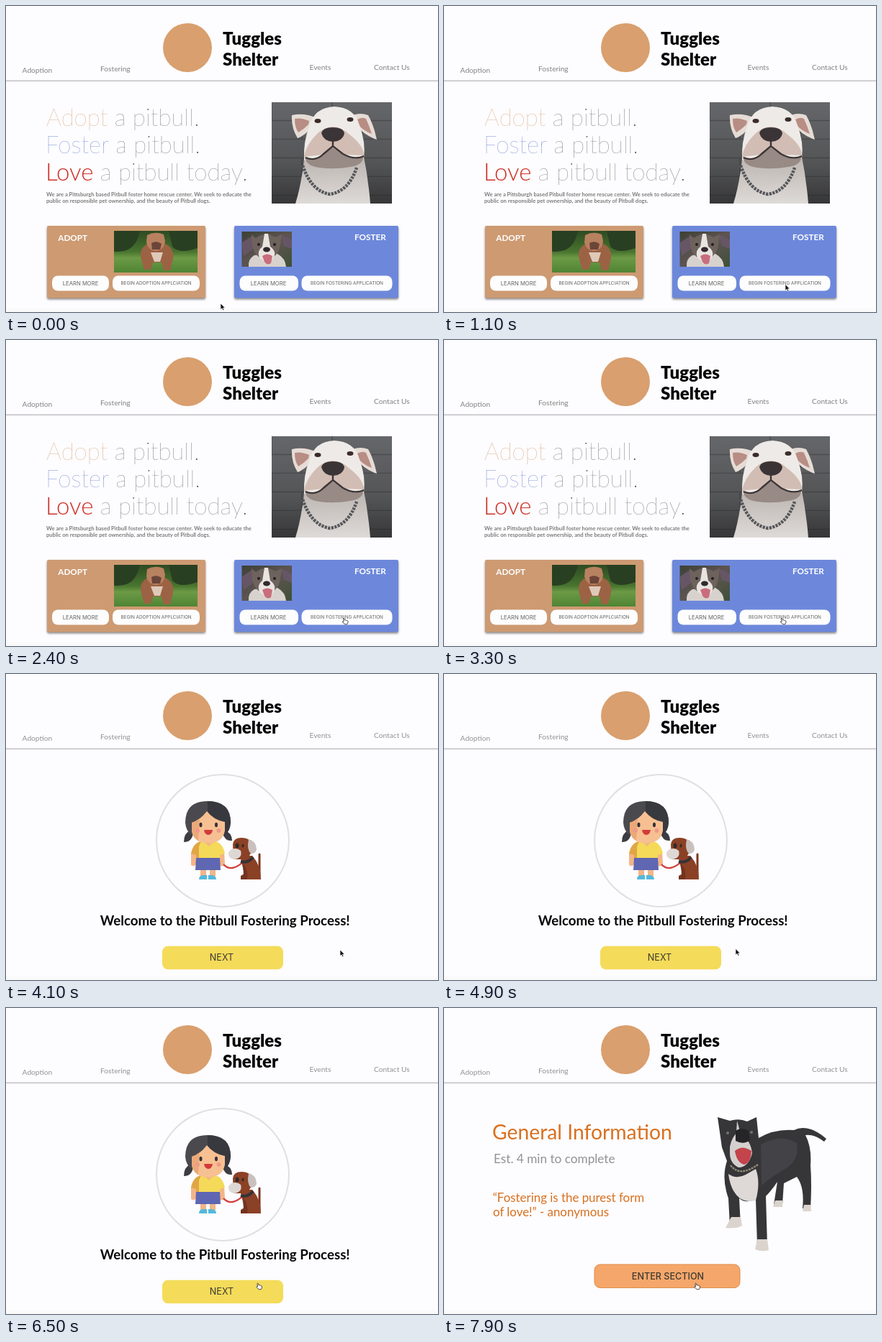
An HTML page that plays this animation: 600x426 px, repeating every 8 s.

```html
<!DOCTYPE html>
<html lang="en">
<head>
<meta charset="utf-8">
<title>Pitbull fostering walkthrough</title>
<style>
html, body { margin: 0; width: 100%; height: 100%; overflow: hidden; background: #fdfcfe; }
svg { display: block; width: 600px; height: 426px; font-family: Lato, sans-serif; }
.nav { font-size: 10.2px; fill: #929292; }
.home .nav { fill: #828282; }
.brand { font-size: 24px; font-weight: 900; fill: #050505; }
.hero { font-size: 33px; font-weight: 100; fill: #555; }
.love { font-weight: 300; fill: #cc2f26; }
.note { font-size: 7.6px; font-weight: 700; fill: #7c7c7c; }
.card { filter: drop-shadow(0 2px 1.5px #0007); }
.label { font-size: 11.7px; font-weight: 700; fill: #fff; }
.btn { font-family: Inter, sans-serif; text-anchor: middle; fill: #626262; }
.big { font-size: 12.6px; fill: #3d3a30; }
.quote { font-size: 16.9px; fill: #d8701f; }
</style>
</head>
<body>
<svg id="stage" viewBox="0 0 600 426">
  <defs>
    <pattern id="brick" width="84" height="52" x="349" y="134" patternUnits="userSpaceOnUse">
      <rect width="84" height="52" fill="#696a6d"/>
      <path d="M0 25.5H84M0 51.5H84M20 0V25M62 26V51" stroke="#515255" stroke-width="1.6"/>
    </pattern>
    <linearGradient id="vignette" x2="0" y2="1">
      <stop offset="0" stop-color="#222" stop-opacity=".05"/>
      <stop offset=".6" stop-color="#222" stop-opacity=".3"/>
      <stop offset="1" stop-color="#1a1a1a" stop-opacity=".65"/>
    </linearGradient>
    <linearGradient id="chest" x2="0" y2="1">
      <stop offset="0" stop-color="#b9b2ae"/>
      <stop offset="1" stop-color="#dedad7"/>
    </linearGradient>
    <linearGradient id="garden" x2="0" y2="1">
      <stop offset="0" stop-color="#2e4a22"/>
      <stop offset=".5" stop-color="#48742f"/>
      <stop offset=".65" stop-color="#6c9a45"/>
      <stop offset="1" stop-color="#4f8434"/>
    </linearGradient>
    <linearGradient id="blooms" x2="1" y2="1">
      <stop offset="0" stop-color="#3c4034"/>
      <stop offset=".5" stop-color="#5d5452"/>
      <stop offset="1" stop-color="#3f5035"/>
    </linearGradient>
  </defs>

  <rect width="600" height="426" fill="#fdfcfe"/>
  <rect y="421" width="600" height="5" fill="#fafafa"/>

  <!-- header -->
  <circle cx="252" cy="58" r="34" fill="#d99f6e"/>
  <g class="brand"><text x="301" y="53.5">Tuggles</text><text x="301" y="82.5">Shelter</text></g>
  <g class="nav">
    <text x="22.6" y="93">Adoption</text><text x="131" y="91.2">Fostering</text>
    <text x="421.5" y="88.5">Events</text><text x="511" y="88.5">Contact Us</text>
  </g>
  <rect y="103.2" width="600" height="2" fill="#cfcdd0"/>

  <!-- home -->
  <g class="page">
    <g class="hero">
      <text x="56" y="166.5"><tspan fill="#c98f5e">Adopt</tspan> a pitbull.</text>
      <text x="55" y="204.5"><tspan fill="#4766c4">Foster</tspan> a pitbull.</text>
      <text x="55" y="243"><tspan class="love">Love</tspan> a pitbull today.</text>
    </g>
    <g class="note">
      <text x="56" y="265">We are a Pittsburgh based Pitbull foster home rescue center. We seek to educate the</text>
      <text x="56" y="274">public on responsible pet ownership, and the beauty of Pitbull dogs.</text>
    </g>

    <svg x="369" y="134" width="167" height="141" viewBox="369 134 167 141">
      <rect x="369" y="134" width="167" height="141" fill="url(#brick)"/>
      <rect x="369" y="134" width="167" height="141" fill="url(#vignette)"/>
      <path d="M415 205Q411 246 402 275H506Q503 238 496 205Z" fill="url(#chest)"/>
      <path d="M432 156Q414 148 397 152Q396 170 405 184Q416 180 425 168ZM478 154Q490 147 503 152Q511 166 515 186Q498 180 488 168Z" fill="#e6dcd6"/>
      <path d="M421 160Q410 155 401 157Q401 169 406 176Q413 172 420 165ZM488 158Q495 154 500 157Q505 168 508 178Q497 174 490 166Z" fill="#b88d83"/>
      <path d="M421 168Q428 141 456 140Q484 141 491 166Q500 190 497 213Q478 224 456 223Q432 224 414 214Q413 188 421 168Z" fill="#eeeae7"/>
      <path d="M432 178Q454 158 476 178Q497 194 497 208L470 207 454 197 440 207 414 210Q416 194 432 178Z" fill="#d2bdb4"/>
      <path d="M415 210Q428 218 440 207L454 197 468 207Q486 217 497 208Q496 222 478 224Q456 228 435 225Q417 223 415 210Z" fill="#988a85"/>
      <path d="M416 211Q430 217 441 206L454 195 468 206Q484 215 497 209M454 187V196" fill="none" stroke="#3c3535" stroke-width="2.4"/>
      <path d="M438 177Q440 169 454 169Q468 169 470 177Q468 188 454 189Q441 188 438 177Z" fill="#3b3436"/>
      <ellipse cx="433" cy="160" rx="4.5" ry="3" fill="#3a2b29"/>
      <ellipse cx="478" cy="158" rx="4.5" ry="3" fill="#3a2b29"/>
      <path d="M412 222Q424 258 450 262Q476 258 487 225" fill="none" stroke="#55565a" stroke-width="4.5" stroke-dasharray="3.2 1.4"/>
    </svg>

    <rect class="card" x="57" y="306" width="220" height="100.5" rx="2" fill="#cd9a72"/>
    <rect class="card" x="317" y="306" width="228" height="100.5" rx="2" fill="#6d88db"/>
    <text class="label" x="72.3" y="326.7">ADOPT</text>
    <text class="label" x="484" y="325.7">FOSTER</text>

    <svg x="150" y="313" width="116" height="58" viewBox="150 313 116 58">
      <rect x="150" y="313" width="116" height="58" fill="url(#garden)"/>
      <path d="M150 313H186Q181 338 163 341T150 338ZM226 313H266V337Q241 346 231 335Z" fill="#293f22"/>
      <path d="M195 332Q184 339 188 353L192 367H201L204 357H216L219 368H228L232 352Q234 337 221 331Z" fill="#9c6244"/>
      <path d="M196 319Q207 313 219 318L221 327Q220 340 208 341Q197 340 195 329Z" fill="#b88160"/>
      <path d="M202 330Q209 326 216 331L214 339H203Z" fill="#6b4539"/>
      <path d="M201 343H218L214 356H206Z" fill="#dec9b9"/>
    </svg>

    <svg x="327.500" y="314" width="69.500" height="49" viewBox="327.500 314 69.500 49">
      <rect x="327" y="314" width="71" height="49" fill="url(#blooms)"/>
      <path d="M327 330L342 320 345 337 330 348ZM382 318L398 326V338L386 334Z" fill="#665665"/>
      <path d="M345 347Q336 352 337 363H389Q388 351 377 345Z" fill="#d8d2ce"/>
      <path d="M347 323L341 318 342 333Q345 350 361 354Q378 350 381 333L383 318 374 322Q361 313 347 323Z" fill="#6e625d"/>
      <path d="M359 317H364L367 335Q377 342 371 352Q362 359 352 351Q348 341 356 335Z" fill="#e9e4e0"/>
      <ellipse cx="362" cy="339" rx="5" ry="3.5" fill="#302a2d"/>
      <path d="M356 348Q363 343 370 348L368 358Q363 362 359 356Z" fill="#c96d7d"/>
      <circle cx="351" cy="332" r="2" fill="#241f20"/><circle cx="373" cy="332" r="2" fill="#241f20"/>
    </svg>

    <g fill="#fdfdfe">
      <rect x="64" y="375.5" width="79" height="21" rx="8"/>
      <rect x="148" y="375.5" width="121" height="21" rx="8"/>
      <rect x="324.5" y="375.5" width="81.5" height="21" rx="8"/>
      <rect x="410.5" y="375.5" width="126" height="21" rx="8"/>
    </g>
    <g class="btn" font-size="7.7">
      <text x="103.5" y="388.8">LEARN MORE</text><text x="364.500" y="388.8">LEARN MORE</text>
    </g>
    <g class="btn" font-size="6.4">
      <text x="208.5" y="388.3">BEGIN ADOPTION APPLCIATION</text>
      <text x="473.5" y="388.3">BEGIN FOSTERING APPLICATION</text>
    </g>
  </g>

  <!-- welcome -->
  <g class="page">
    <circle cx="301" cy="232" r="92" fill="#fdfcfe" stroke="#e0dfe1" stroke-width="2"/>
    <!-- girl -->
    <path d="M258 217Q247 220 247 234Q258 234 260 222ZM303 217Q314 221 314 232Q304 233 301 222Z" fill="#3c3c43"/>
    <path d="M249 207Q249 177 280 177Q312 177 312 207Q311 219 304 224H257Q250 218 249 207Z" fill="#4a494e"/>
    <path d="M280 177Q312 177 312 207Q311 219 304 224H280Z" fill="#38383f"/>
    <path d="M276 230H287V241H276Z" fill="#e9a577"/>
    <path d="M257 248H264V265Q261 269 257 266ZM297 248H303L304 264Q303 269 297 267Z" fill="#f3b587"/>
    <path d="M270 272H278V282H270ZM283 272H291V282H283Z" fill="#f3b587"/>
    <path d="M268 286Q268 280 274 280H279V286ZM281 286V280H286Q292 281 292 286Z" fill="#53b8dc"/>
    <path d="M271 233H290Q301 235 304 250L297 252V258H264V252L257 250Q260 235 271 233Z" fill="#f4da58"/>
    <path d="M271 233Q260 235 257 250L264 252V258H268V240Z" fill="#e0a646"/>
    <path d="M264 256H297L298 273H263Z" fill="#5f66b2"/>
    <path d="M258 207Q270 203 279 191Q288 203 304 206V218Q301 235 281 236Q260 235 258 218Z" fill="#f7c092"/>
    <path d="M258 207Q264 205 269 201L267 232Q259 227 258 218Z" fill="#eca978"/>
    <path d="M275 233Q281 238 288 233L282 240Z" fill="#f3b587"/>
    <ellipse cx="270.500" cy="210" rx="2" ry="3.3" fill="#343139"/>
    <ellipse cx="292" cy="210" rx="2" ry="3.3" fill="#343139"/>
    <circle cx="266" cy="218" r="3" fill="#f0998b"/><circle cx="295.500" cy="218" r="3" fill="#f0998b"/>
    <path d="M275 217H287Q286 224 281 224Q276 224 275 217Z" fill="#d23b39"/>
    <!-- leashed dog -->
    <path d="M302 265Q313 277 330 261" fill="none" stroke="#d23e3b" stroke-width="2.4"/>
    <path d="M352 282V251" stroke="#7c351f" stroke-width="3" stroke-linecap="round"/>
    <path d="M325 253H342Q354 266 354 286H326V281L331 278Z" fill="#8b4125"/>
    <path d="M329 264Q337 273 335 286H326V282L330 280Z" fill="#72331f"/>
    <path d="M315 237Q316 228 327 228Q341 228 342 241Q341 255 330 258H316Z" fill="#8b4125"/>
    <path d="M337 230Q347 232 348 244Q347 250 340 250Q334 244 337 230Z" fill="#c9c1bf"/>
    <path d="M313 244Q321 241 326 246Q329 256 317 258Q308 257 309 248Z" fill="#ded8d5"/>
    <ellipse cx="321" cy="239" rx="2.500" ry="3.500" fill="#302b2b"/>
    <ellipse cx="329" cy="239" rx="1.500" ry="2.500" fill="#302b2b"/>
    <path d="M326 261Q336 264 343 255" fill="none" stroke="#363338" stroke-width="4"/>

    <text x="130.8" y="350" font-size="18.7" font-weight="700" fill="#080808">Welcome to the Pitbull Fostering Process!</text>
    <rect x="217" y="378.800" width="168" height="32.500" rx="8" fill="#f4db5a"/>
    <text class="btn big" x="299.500" y="399">NEXT</text>
  </g>

  <!-- section -->
  <g class="page">
    <text x="67" y="183" font-size="28.3" fill="#d9701f">General Information</text>
    <text x="69" y="216" font-size="17.2" fill="#929292">Est. 4 min to complete</text>
    <g class="quote">
      <text x="67.700" y="269.500">“Fostering is the purest form</text>
      <text x="68" y="290">of love!” - anonymous</text>
    </g>

    <path d="M380 152L397 157Q410 153 421 158L434 152 437 181Q459 168 486 170Q505 160 531 182L528 186Q513 175 502 177Q511 194 509 219Q511 246 509 279H498Q501 249 490 235L472 244 470 274H458L463 242Q455 254 447 262L449 330H435L433 266Q419 273 410 265L412 303H397L395 265Q385 237 393 213L386 194Z" fill="#363538"/>
    <path d="M440 190Q468 174 490 188Q494 209 477 222Q455 235 441 247Z" fill="#434246"/>
    <path d="M395 231Q406 239 419 232L433 224Q440 243 433 268Q421 271 411 265Q398 255 395 231Z" fill="#ded9d6"/>
    <path d="M407 157L412 175Q426 184 428 202Q423 222 409 222Q396 216 397 199Q396 186 406 174Z" fill="#d5d0cf"/>
    <path d="M405 171Q413 165 423 171L425 184Q416 191 405 185Z" fill="#252427"/>
    <path d="M404 199Q414 190 427 199Q426 216 417 218Q407 216 404 199Z" fill="#c4444b"/>
    <path d="M398 219Q411 236 436 218" fill="none" stroke="#918877" stroke-width="2.5" stroke-dasharray="3 1"/>
    <path d="M399 291H412L414 303Q405 308 391 306ZM435 322H449L451 337Q442 340 432 336ZM460 268H470V277H457ZM500 274H509L510 283H498Z" fill="#dbd4ce"/>
    <circle cx="394" cy="174" r="2" fill="#77716e"/><circle cx="427" cy="173" r="2" fill="#77716e"/>

    <rect x="209" y="357" width="202" height="32.500" rx="8" fill="#f5a76b" stroke="#df8c4a"/>
    <text class="btn big" x="311" y="377.800" font-weight="500">ENTER SECTION</text>
  </g>

  <g id="arrow"><path d="M0 0V8.600L2 6.800 3.400 9.800 4.800 9.100 3.500 6.300H6.200Z" fill="#111" stroke="#fff" stroke-width=".6"/></g>
  <g id="hand"><path d="M.3 .6Q1.400-.4 2 .8L2.600 3Q3.700 2.300 4.200 3.200Q5.300 2.800 5.700 3.700Q6.900 3.500 7 4.800Q7.200 7 5.800 8.700H2.400Q1.400 7-.9 5.400Q-.4 4.200 1.200 5Z" fill="#fff" stroke="#222" stroke-width=".8"/></g>
</svg>
<script>
const LOOP = 8000, TO_WELCOME = 3400, TO_SECTION = 6900;
const stage = document.getElementById('stage');
const pages = document.querySelectorAll('.page');
const pointers = { arrow: document.getElementById('arrow'), hand: document.getElementById('hand') };

// time, x, y of the pointer tip
const path = [
  [0, 298, 414], [100, 298, 414], [1100, 474, 387.5],
  [1500, 468, 387], [3300, 468, 387], [3600, 464, 384], [4500, 464, 384],
  [5300, 346, 381], [5800, 346, 381], [6200, 348.5, 383], [LOOP, 348.5, 383]
];
const ease = u => u * u * (3 - 2 * u);

function pointerAt(t) {
  const i = path.findIndex(p => p[0] > t);
  const [t0, x0, y0] = path[i - 1], [t1, x1, y1] = path[i];
  const u = ease((t - t0) / (t1 - t0));
  return [x0 + (x1 - x0) * u, y0 + (y1 - y0) * u];
}

function draw(now) {
  const t = Math.floor(now % LOOP / 100) * 100;
  const current = t < TO_WELCOME ? 0 : t < TO_SECTION ? 1 : 2;
  pages.forEach((page, i) => page.style.display = i === current ? '' : 'none');
  stage.classList.toggle('home', current === 0);

  const kind = t >= 1200 && t < TO_WELCOME || t >= 5100 ? 'hand' : 'arrow';
  for (const name in pointers) {
    pointers[name].style.display = name === kind ? '' : 'none';
    pointers[name].setAttribute('transform', `translate(${pointerAt(t)})`);
  }
  requestAnimationFrame(draw);
}
requestAnimationFrame(draw);
</script>
</body>
</html>
```
